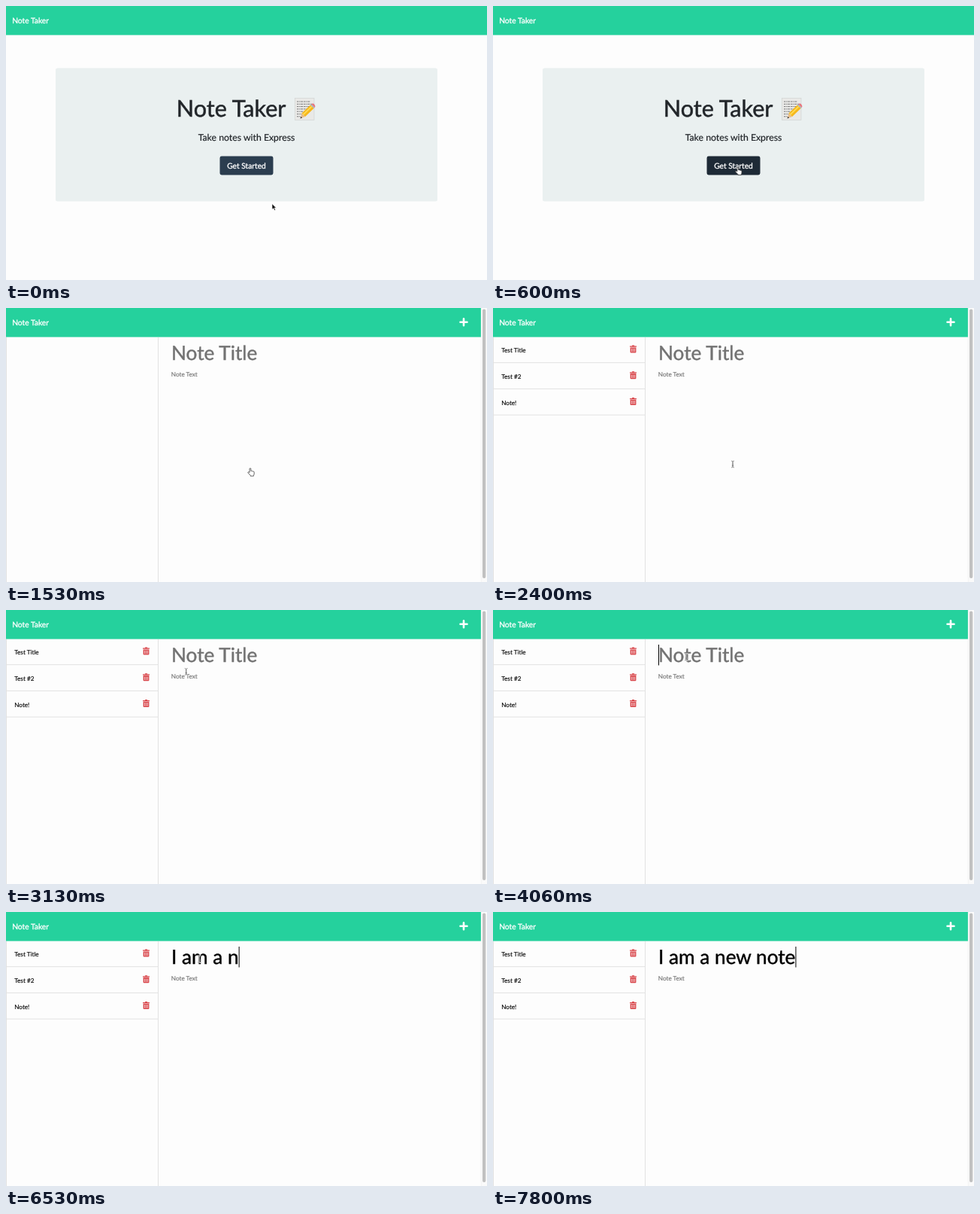
Animation, 640 px wide and 364 px high, one loop 8000 ms. Source, as an HTML page:

```html
<!DOCTYPE html>
<html lang="en">
<head>
<meta charset="utf-8">
<title>Note Taker</title>
<style>
  html, body { margin: 0; width: 100%; height: 100%; overflow: hidden; background: #fdfdfd; }
  svg { display: block; width: 640px; height: 364px; }
  text {
    font-family: Lato, sans-serif; white-space: pre; text-rendering: geometricPrecision;
    fill: currentColor; stroke: currentColor; stroke-width: .016em;
  }
  #home { color: #212529; }
  .brand { font-size: 10.24px; color: #fff; stroke-width: .032em; }
  .body { font-size: 8.2px; }
  .field { font-size: 26.2px; }
  .line { fill: none; stroke: #e2e2e2; }
  .hint { color: #727272; }
</style>
</head>
<body>
<svg viewBox="0 0 640 364">
  <defs>
    <g id="trash" fill="#d9464b">
      <path d="M0 1.2h2.6l.6-1h2.6l.6 1H9v1.2H0z"/>
      <path fill-rule="evenodd" d="M.6 3h7.8v6.2q0 1-1 1H1.6q-1 0-1-1zM2.2 4.3v4.6h.7V4.3zM4.15 4.3v4.6h.7V4.3zM6.1 4.3v4.6h.7V4.3z"/>
    </g>
    <path id="beamShape" d="M-1.6-4.4Q0-4.4 0-3.2V3.2Q0 4.4-1.6 4.4M1.6-4.4Q0-4.4 0-3.2V3.2Q0 4.4 1.6 4.4M-.8 1.6H.8"/>
  </defs>
  <rect width="640" height="364" fill="#fdfdfd"/>
  <rect id="nav" width="640" height="38.6" fill="#25d19d"/>
  <text class="brand" x="8.2" y="22.8">Note Taker</text>

  <g id="home">
    <rect x="66" y="82.5" width="508" height="177" rx="2.5" fill="#eaf0f0"/>
    <text x="226.8" y="147.3" font-size="30.6">Note Taker</text>
    <g id="memo">
      <rect x="384.5" y="122.5" width="25.5" height="29" fill="#e9e9e7" stroke="#d2d4d3" stroke-width=".7"/>
      <path d="M387 127h18M387 130.3h20M387 133.6h17M387 136.9h13M387 140.2h10M387 143.5h6M387 146.8h5"
            stroke="#777" stroke-width="1" stroke-dasharray="2.4 .8 1.3 .7 3 .9" fill="none"/>
      <path d="M391.5 149.5l2-7 4.6 4.5z" fill="#e7bd8b"/>
      <path d="M391.5 149.5l.8-2.6 1.8 1.7z" fill="#333"/>
      <path d="M393.5 142.5l11.5-11 4.6 4.6-11.5 10.9z" fill="#f6b81c"/>
      <path d="M394.8 143.8l11.5-11 1.2 1.2-11.5 11z" fill="#ffdc55"/>
      <path d="M405 131.5l1.3-1.2 4.6 4.6-1.3 1.2z" fill="#a9b5b8"/>
      <path d="M406.3 130.3q2.2-1.6 4 .4t.6 4.2z" fill="#e8747c"/>
    </g>
    <text x="320" y="179" font-size="12.29" text-anchor="middle">Take notes with Express</text>
    <rect id="ring" x="283.6" y="198.6" width="72.8" height="26.8" rx="3" fill="none" stroke="#2c3e50" stroke-width="1.8"/>
    <rect id="button" x="284.5" y="199.5" width="71" height="25" rx="2.4"/>
    <text class="brand" x="320" y="215.7" text-anchor="middle">Get Started</text>
  </g>

  <g id="notes">
    <path class="line" d="M.5 39V364M202.5 39V364"/>
    <g id="list"></g>
    <text id="title" class="field" x="220" y="69.3"></text>
    <text class="body hint" x="219.8" y="90.8">Note Text</text>
    <path d="M609 14.2v9M604.5 18.7h9" stroke="#fff" stroke-width="2.6" stroke-linecap="round"/>
    <rect x="632" width="8" height="364" fill="#fafafa"/>
    <path d="M632.25 0V364" stroke="#e8e8e8" stroke-width=".5"/>
    <rect x="634" y="1.5" width="4.3" height="357.5" rx="2.1" fill="#c1c1c1"/>
    <rect id="caret" y="46" width="1" height="27.5"/>
  </g>

  <g id="cursor">
    <path id="arrow" d="M0 0v7.6l1.8-1.6 1.3 2.9 1.4-.6-1.3-2.8h2.4z" fill="#111" stroke="#fff" stroke-width=".6"/>
    <path id="hand" d="M-.9.8q0-1 .9-1t.9 1v2.8q1-.6 1.5.2 1-.4 1.4.4 1.4-.3 1.4 1V7q0 1.2-.7 2.2v1H.2V9.3L-2.9 6.1q-.6-.9.2-1.3t1.8.8z"
          fill="#fff" stroke="#333" stroke-width=".75" stroke-linejoin="round"/>
    <g id="beam" fill="none" stroke-linecap="round">
      <use href="#beamShape" stroke="#fff" stroke-width="1.6"/>
      <use href="#beamShape" stroke="#555" stroke-width=".6"/>
    </g>
  </g>
</svg>
<script>
const LOOP = 8000, PAGE_CHANGE = 1530, LIST_LOADED = 1600, FOCUS = 4060, POINTER_HIDDEN = 6930;
const TEXT = 'I am a new note';
// Time at which each character of TEXT is typed
const KEYS = [5460, 5600, 5800, 5900, 6000, 6260, 6400, 6530, 6630, 6730, 6930, 7400, 7600, 7660, 7800];
// Pointer stops: time, x, y
const PATH = [
  [60, 354, 262.7], [660, 325, 213], [1600, 325, 213], [1601, 325, 217], [2260, 325, 217],
  [3130, 239.7, 82], [3660, 256.5, 63], [3800, 256.5, 63], [3860, 257, 62.5]
];

const $ = id => document.getElementById(id);
const show = (id, on) => $(id).style.display = on ? '' : 'none';
const clamp = v => Math.min(1, Math.max(0, v));
const ease = v => v * v * (3 - 2 * v);
const mix = (a, b, p) => a + (b - a) * p;

$('list').innerHTML = ['Test Title', 'Test #2', 'Note!'].map((name, i) => {
  const y = 34.7 * i;
  return `<text class="body" x="11.2" y="${59.2 + y}">${name}</text>
    <use href="#trash" x="182" y="${49.4 + y}"/>
    <path class="line" d="M0 ${72.7 + y}H202.5"/>`;
}).join('');

function pointer(t) {
  let [start, x, y] = PATH[0];
  for (const [end, endX, endY] of PATH.slice(1)) {
    const p = ease(clamp((t - start) / (end - start)));
    x = mix(x, endX, p);
    y = mix(y, endY, p);
    start = end;
  }
  return [x, y];
}

function draw(t) {
  const onNotes = t >= PAGE_CHANGE, loaded = t >= LIST_LOADED;
  show('home', !onNotes);
  show('notes', onNotes);
  show('list', loaded);
  $('nav').setAttribute('width', onNotes ? 632 : 640);

  const [x, y] = pointer(t);
  const hover = !loaded && y < 224.5;
  $('cursor').setAttribute('transform', `translate(${x} ${y})`);
  show('arrow', !loaded && !hover);
  show('hand', hover);
  show('beam', loaded && t < POINTER_HIDDEN);

  const dark = clamp((t - 330) / 150);
  $('button').setAttribute('fill', `rgb(${mix(43, 30, dark)},${mix(61, 42, dark)},${mix(79, 54, dark)})`);
  $('ring').setAttribute('opacity', .6 * clamp((t - 900) / 200));

  const typed = KEYS.filter(k => t >= k).length;
  const title = $('title');
  title.textContent = typed ? TEXT.slice(0, typed) : 'Note Title';
  title.classList.toggle('hint', !typed);
  show('caret', typed || (t >= FOCUS && (t < 4600 || t >= 5100)));
  const width = typed ? title.getComputedTextLength() : 0;
  $('caret').setAttribute('x', 220 + width);
}

function frame() {
  draw(performance.now() % LOOP);
  requestAnimationFrame(frame);
}
frame();
</script>
</body>
</html>
```
